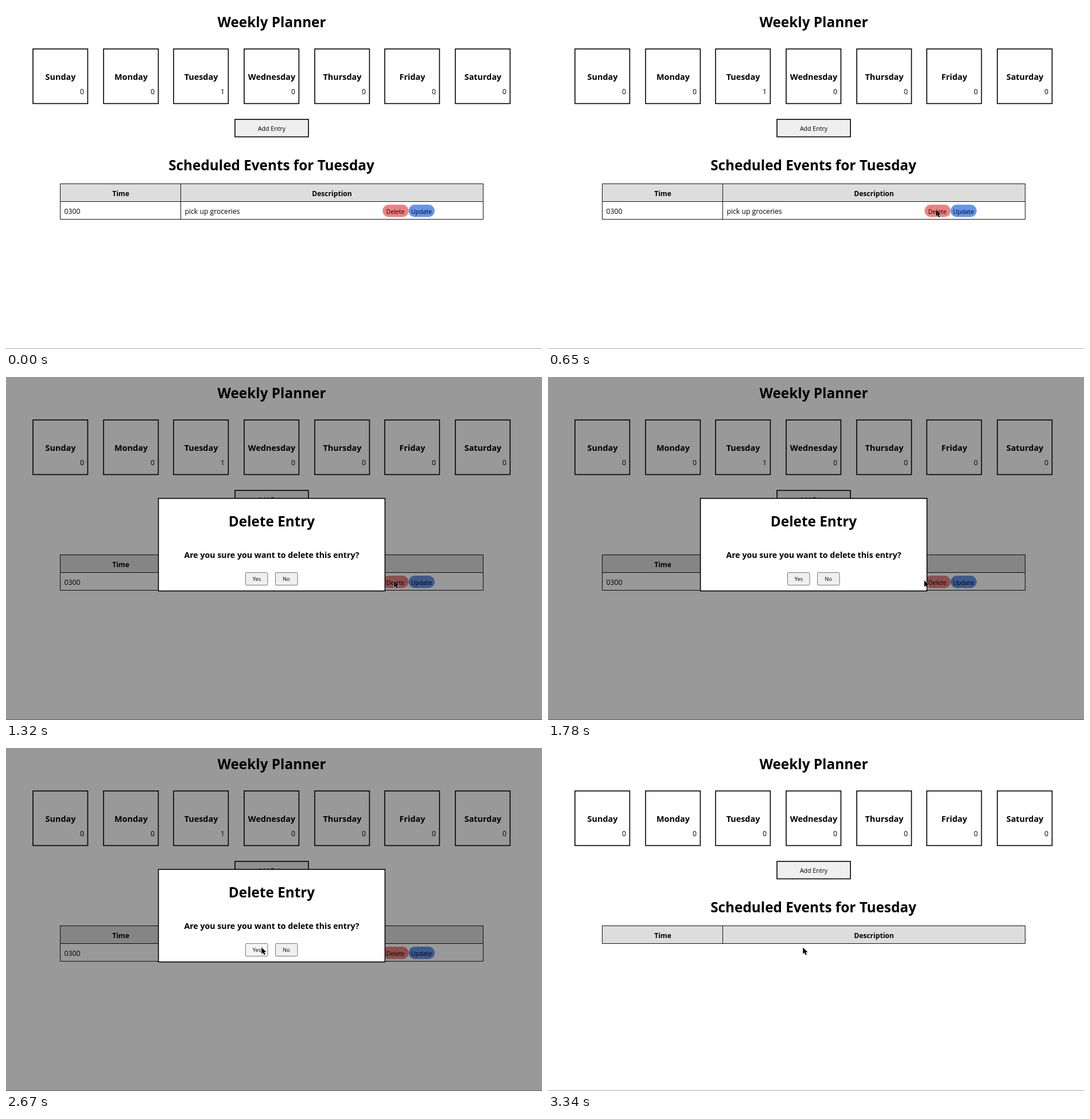
Recreate the animation shown at these times as an HTML page. Size 934 px wide and 599 px high, loop 3.8 s.

```html
<!DOCTYPE html>
<html lang="en">
<head>
<meta charset="utf-8">
<title>Weekly Planner</title>
<style>
  html, body { margin: 0; width: 100%; height: 100%; overflow: hidden; background: #fff; }
  svg { display: block; }
  text { font: 12.2px "Open Sans", "Noto Sans", sans-serif; }
  .mid { text-anchor: middle; }
  .end { text-anchor: end; }
  .h1 { font-size: 24.3px; font-weight: 700; }
  .h3 { font-size: 14.4px; font-weight: 700; }
  .th { font-size: 12.1px; font-weight: 700; }
  .btn { font-size: 10.6px; }
  .small { font-size: 9.3px; }
  .box { fill: none; stroke: #000; stroke-width: 1.6; }
  .line { fill: none; stroke: #111; }
  .choice { fill: #efefef; stroke: #767676; }
</style>
</head>
<body>
<svg width="934" height="599" viewBox="0 0 934 599">
  <text class="h1 mid" x="463" y="37">Weekly Planner</text>
  <g id="days"></g>
  <rect class="box" x="399" y="198" width="128" height="30.5" style="fill:#efefef"/>
  <text class="btn mid" x="463" y="217.6">Add Entry</text>
  <text class="h1 mid" x="462.5" y="286.5">Scheduled Events for Tuesday</text>

  <rect x="94" y="310" width="737" height="32" fill="#dcdddc"/>
  <path class="line" d="M94.5 310.5H831.5V341.5H94.5ZM304.5 310V342"/>
  <text class="th mid" x="200" y="331.7">Time</text>
  <text class="th mid" x="568" y="331.7">Description</text>

  <g id="entry">
    <path class="line" d="M94.5 342V372.5H831.5V342M304.5 342V373"/>
    <text x="101.5" y="362.7">0300</text>
    <text x="311.5" y="362.7">pick up groceries</text>
    <rect x="656.3" y="347" width="45.3" height="21.5" rx="10.7" fill="#f08080"/>
    <rect x="701.6" y="347" width="45.3" height="21.5" rx="10.7" fill="#6495ed"/>
    <text class="btn mid" x="678.5" y="362.8">Delete</text>
    <text class="btn mid" x="724" y="362.8">Update</text>
  </g>
  <path d="M0 598.5H934" stroke="#a5a5a5"/>

  <g id="dialog">
    <rect width="934" height="599" fill="#000" opacity=".4"/>
    <rect class="box" x="265.6" y="212" width="394.8" height="161.6" style="fill:#fff"/>
    <text class="h1 mid" x="463" y="261">Delete Entry</text>
    <text class="h3 mid" x="463" y="315.6" style="font-size:14.2px">Are you sure you want to delete this entry?</text>
    <rect id="yes" class="choice" x="417.5" y="341.5" width="38.5" height="22" rx="1.5"/>
    <rect class="choice" x="469.5" y="341.5" width="38.5" height="22" rx="1.5"/>
    <text class="small mid" x="437" y="356.4">Yes</text>
    <text class="small mid" x="488.5" y="356.4">No</text>
  </g>

  <g id="pointer">
    <circle id="click" cx="1" cy="2.5" r="9" fill="#fff000" opacity=".62"/>
    <path d="M0 0V12.3L2.8 9.7L4.7 13.8L7.2 12.7L5.4 8.8H9.2Z" stroke="#fff" stroke-width=".5"/>
  </g>
</svg>
<script>
const $ = id => document.getElementById(id);
const names = ["Sunday", "Monday", "Tuesday", "Wednesday", "Thursday", "Friday", "Saturday"];

$("days").innerHTML = names.map((name, i) => {
  const x = 46 + Math.round(i * 122.63);
  return `<rect class="box" x="${x + 1}" y="75" width="95.4" height="95.4"/>
    <text class="h3 mid" x="${x + 49}" y="129">${name}</text>
    <text class="end" id="n${i}" x="${x + 90}" y="153.7">0</text>`;
}).join("");

const easeOut = u => 1 - (1 - u) ** 2;
const glide = u => 0.4 * u + 0.6 * u * u * (3 - 2 * u);

// Each move shows `steps` poses; `first` is the share of the path in the first pose.
const moves = [
  { start: 130, end: 650, steps: 8, first: 0, from: [886, 563], to: [676, 355.5], ease: easeOut },
  { start: 1780, end: 2200, steps: 7, first: 1 / 7, from: [676, 355.5], to: [447.5, 347], ease: glide },
  { start: 2530, end: 2740, steps: 4, first: 1 / 4, from: [447.5, 347], to: [444, 348], ease: u => u }
];

function pointerAt(t) {
  const m = moves.filter(m => t >= m.start).pop();
  if (!m) return null;
  const last = m.steps - 1;
  const k = Math.min(last, Math.floor((t - m.start) / (m.end - m.start) * last + 1e-6));
  const p = m.ease(m.first + (1 - m.first) * k / last);
  return m.from.map((a, i) => a + (m.to[i] - a) * p);
}

const within = (t, a, b) => t >= a && t < b;
const show = (id, on) => $(id).style.display = on ? "" : "none";

function draw(t) {
  const pos = pointerAt(t);
  show("pointer", pos);
  if (pos) $("pointer").setAttribute("transform", `translate(${pos})`);
  show("click", within(t, 1250, 1320) || within(t, 3270, 3340));
  show("dialog", within(t, 1320, 3340));
  show("entry", t < 3340);
  $("yes").style.fill = t >= 2200 ? "#f5f5f5" : "";
  $("n2").textContent = t < 3340 ? 1 : 0;
}

const began = performance.now();
function tick() {
  draw((performance.now() - began) % 3800);
  requestAnimationFrame(tick);
}
tick();
</script>
</body>
</html>
```
